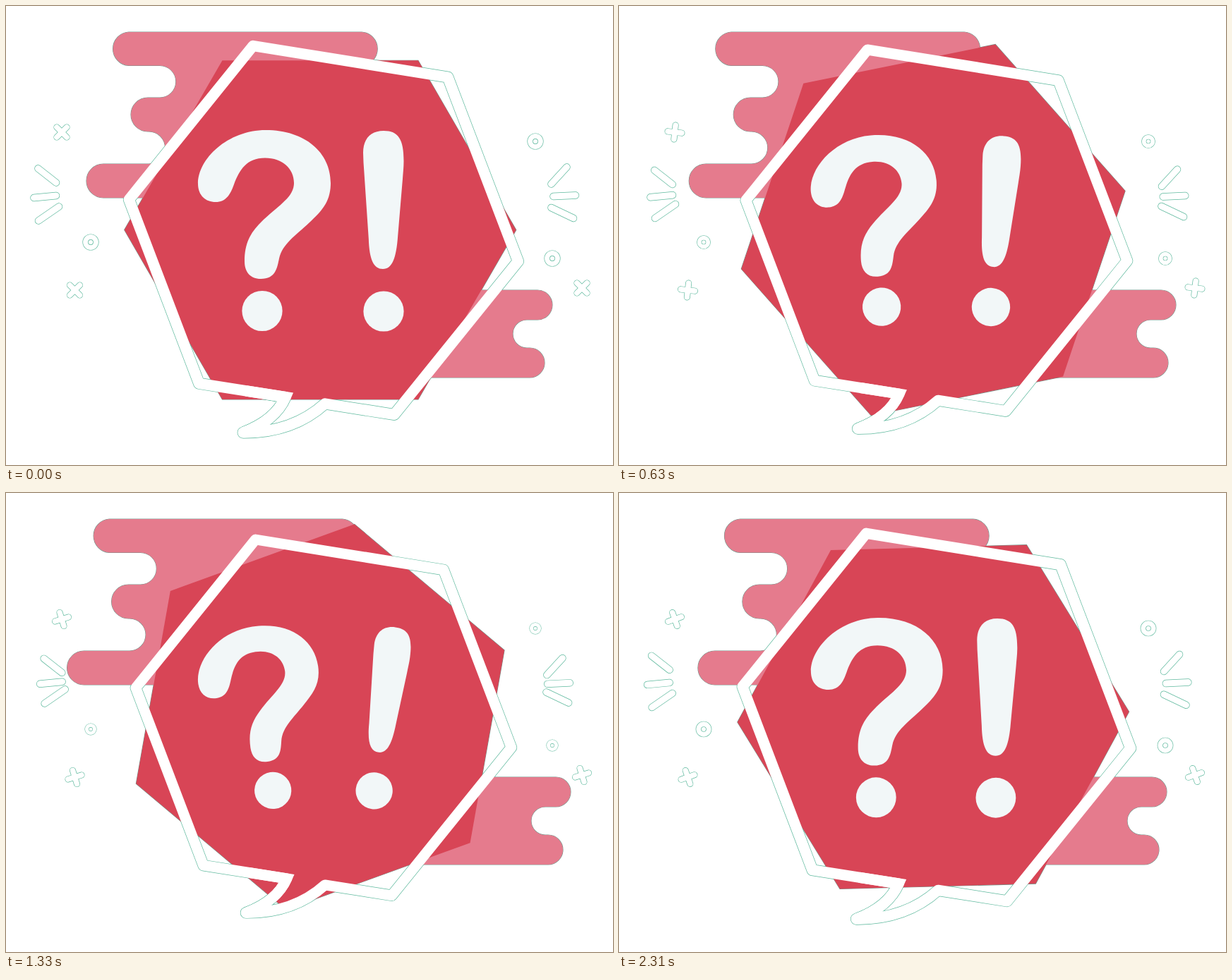
An HTML page that plays this animation: 860x651 px, repeating every 2340 ms.

```html
<!DOCTYPE html>
<html lang="en">
<head>
<meta charset="utf-8">
<title>Question bubble</title>
<style>
  html, body { margin: 0; width: 100%; height: 100%; overflow: hidden; background: #fff; }
  svg { display: block; width: 100%; height: 100%; }
  .line { fill: none; stroke-linecap: round; stroke-linejoin: round; }
  .rim { stroke: #5fb99e; }
  .face { stroke: #fff; }
  .edge { stroke: #6f9389; stroke-width: 1.1; fill: none; }
  .mark { fill: #f2f7f8; }
</style>
</head>
<body>
<svg viewBox="0 0 860 651">
  <defs>
    <path id="blobL" d="M173.8 37H504a23.8 23.8 0 0 1 0 47.5H480V272H138a24 24 0 0 1 0-48H202.5a23 23 0 0 0 0-46H201a24 24 0 0 1 0-48H218a22.7 22.7 0 0 0 0-45.5H173.8a23.8 23.8 0 0 1 0-47.5Z"/>
    <path id="blobR" d="M540 403H753a21 21 0 0 1 0 42H738a20 20 0 0 0 0 40H742a21 21 0 0 1 0 42H540Z"/>
    <polygon id="hex"/>
    <g id="bubble">
      <path d="M396 554.6L273.5 535.3L174.3 274.5L350 56.5L626 101L725.5 362L550 579.5L452 564Q406 605.5 336 605Q381.5 588 396 554.6Z"/>
      <path stroke-linejoin="miter" stroke-linecap="butt" d="M340 545.8L396 554.6Q381.5 588 336 605"/>
    </g>
    <g id="rays"></g>
    <g id="crosses"></g>
    <g id="rings"></g>
  </defs>

  <g class="line rim">
    <use href="#bubble" stroke-width="16.8"/>
    <use href="#rays" stroke-width="10.4"/>
    <use href="#crosses" stroke-width="9"/>
    <use href="#rings" stroke-width="8.4"/>
  </g>
  <g class="edge">
    <use href="#blobL"/><use href="#blobR"/><use href="#hex"/>
  </g>
  <g fill="#e57b8d">
    <use href="#blobL"/><use href="#blobR"/>
  </g>
  <use href="#hex" fill="#d84556"/>
  <g class="line face">
    <use href="#bubble" stroke-width="15.4"/>
    <use href="#rays" stroke-width="9"/>
    <use href="#crosses" stroke-width="7.6"/>
    <use href="#rings" stroke-width="7"/>
  </g>
  <g id="ask" class="mark">
    <path d="M272 252C272 217 314 176 368 176C424 176 460 208 460 251C460 278 447 291 430 307C410 326 392 337 387 358C384 372 382 387 361 387C346 387 338 377 338 362C338 337 346 322 361 307C385 283 408 272 408 251C408 231 392 215.5 367 215.5C341 215.5 331 232 323 253C318 267 312 278 297 278C282 278 272 268 272 252Z"/>
    <circle cx="363" cy="432.5" r="28.6"/>
  </g>
  <g id="bang" class="mark">
    <path d="M506 208C506 188 517 177 535 177C556 177 563.5 189 563.5 220C563.5 229 562.5 237 562 245L555.2 326C553 358 547 373 534 373C521 373 514.8 360 513.8 330L506.5 222Z"/>
    <circle cx="535" cy="433" r="28.6"/>
  </g>
</svg>
<script>
const LOOP = 2340, STEP = 70, COUNT = 29;
const PAUSES = [1, 8, 16, 23, 30]; // slots that repeat the previous picture

const $ = id => document.getElementById(id);
const move = (el, value) => el.setAttribute("transform", value);

function add(parent, tag, attrs) {
  const el = document.createElementNS("http://www.w3.org/2000/svg", tag);
  for (const key in attrs) el.setAttribute(key, attrs[key]);
  return $(parent).appendChild(el);
}

const HUB = [445.2, 317.6];
$("hex").setAttribute("points", Array.from({ length: 6 }, (_, k) => {
  const a = k * Math.PI / 3;
  return [HUB[0] + 277.5 * Math.cos(a), HUB[1] + 277.5 * Math.sin(a)];
}).join(" "));

// line, then its shift at full swing
const rays = [
  ["M45.5 230.5L71 250.5", 9.5, 5],
  ["M39.5 272L71 269", 10, -1.5],
  ["M46 304.5L75 284.5", 10, -7],
  ["M794.5 228.5L772.5 252.5", -7, 6.5],
  ["M775.5 270L807 268.5", -9.5, 1],
  ["M772.5 286L804 301", -8, -4]
].map(([d, x, y]) => ({ el: add("rays", "path", { d }), x, y }));

const crosses = [[79, 179], [97.5, 403], [816, 400]].map(at =>
  ({ el: add("crosses", "path", { d: "M-10 0H10M0 -10V10" }), at }));

const rings = [[120, 335], [750, 192], [774, 358]].map(at =>
  ({ el: add("rings", "circle", { r: 7.4 }), at }));

// linear out and back, 0 to 1 to 0
const swing = (i, peak) => i < peak ? i / peak : (COUNT - i) / (COUNT - peak);

const pose = (el, [x, y], angle, scale) =>
  move(el, `translate(${x} ${y}) rotate(${angle}) scale(${scale}) translate(${-x} ${-y})`);

function draw(t) {
  const slot = Math.floor((t % LOOP) / STEP);
  const i = slot - PAUSES.filter(p => p <= slot).length;
  const s = swing(i, 14);

  move($("blobL"), `translate(${-30.6 * swing(i, 14.5)} 0)`);
  move($("blobR"), `translate(${30 * s} 0)`);
  pose($("hex"), HUB, -23 * s, 1);
  pose($("bubble"), [450, 330], 0, 1 - 0.04 * s);
  pose($("ask"), [366, 318.5], -9.5 * s, 1 - 0.1 * s);
  pose($("bang"), [534.8, 319], 8.5 * s, 1 - 0.1 * s);

  for (const { el, x, y } of rays) move(el, `translate(${x * s} ${y * s})`);
  for (const { el, at } of crosses) move(el, `translate(${at}) rotate(${45 + 7.35 * i})`);
  for (const { el, at } of rings) move(el, `translate(${at}) scale(${1 - 0.3 * s})`);
}

function tick(now) {
  draw(now);
  requestAnimationFrame(tick);
}
draw(0);
requestAnimationFrame(tick);
</script>
</body>
</html>
```
